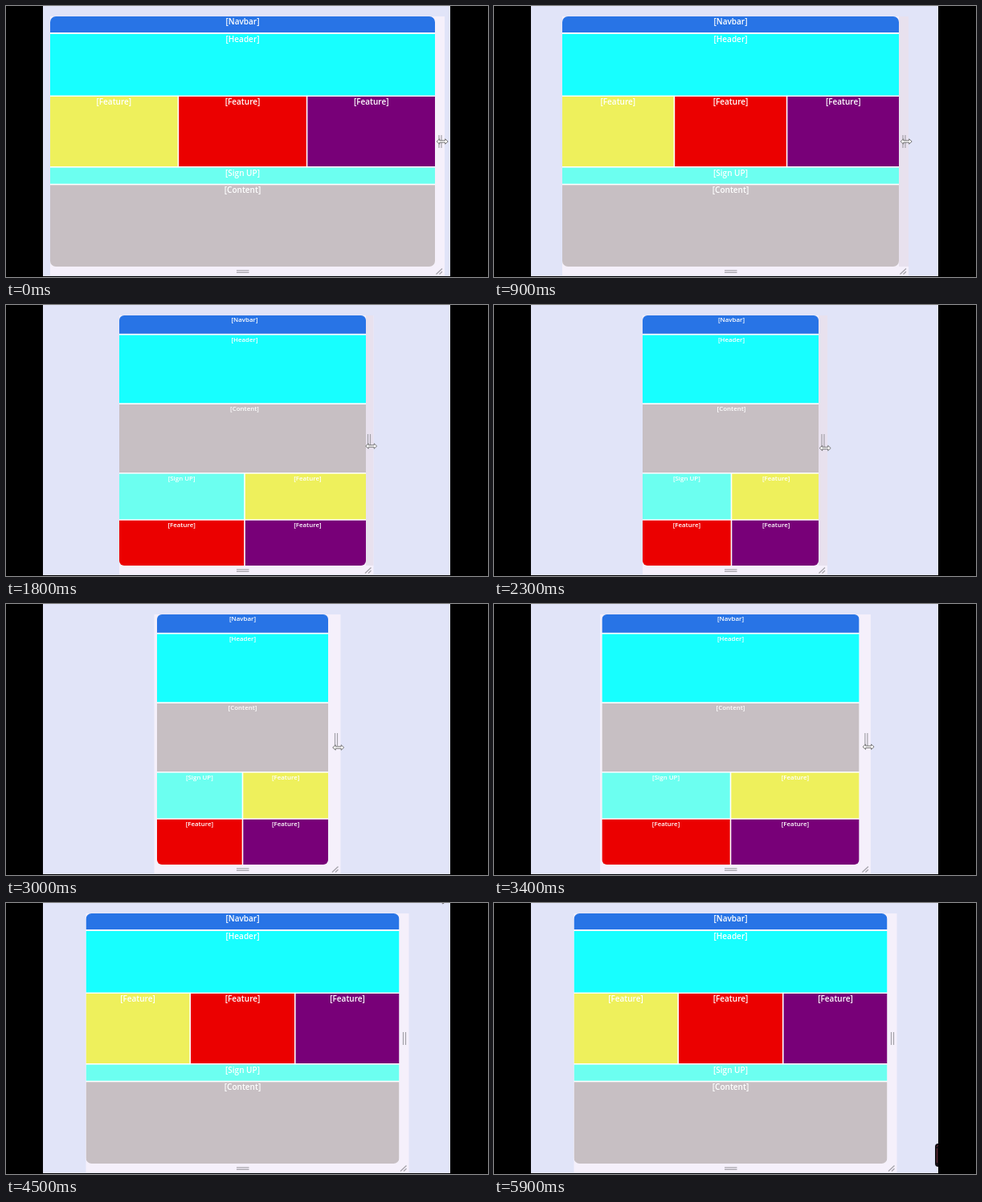
Animation of 600x338 px, one loop 6000 ms. Source, as an HTML page with a canvas:

```html
<!DOCTYPE html>
<html lang="en">
<head>
<meta charset="utf-8">
<title>Responsive grid</title>
<style>
  html, body { margin: 0; width: 100%; height: 100%; overflow: hidden; background: #000; }
  canvas { display: block; }
</style>
</head>
<body>
<canvas id="stage" width="600" height="338"></canvas>
<script>
const ctx = document.getElementById('stage').getContext('2d');
const LOOP = 6000, STEP = 100, MIRROR = 589, GAP = 1.6;
const BREAKPOINT = 350;

// [time, left edge of the grid, layout lag while dragging, cursor y]
const drag = [
  [0, 55, 0, 169], [700, 81, 0, 169], [900, 85, 0, 169], [1400, 117, 0, 172],
  [1800, 141, -5, 176], [2100, 169, -4, 178], [2500, 201, 0, 179], [2700, 202, 0, 179],
  [3000, 188, 3.5, 179], [3500, 121, 2, 178], [3700, 107, 0, 177], [4100, 97, 0, 177],
  [4300, 99.5, 0, 177], [6000, 99.5, 0, 177]
];

const color = {
  Navbar: '#2874e6', Header: '#17ffff', Content: '#c7bfc3', 'Sign UP': '#6cfff0',
  yellow: '#eef05c', red: '#eb0000', purple: '#780078'
};

// Rows: top, bottom, cells
const features = ['yellow', 'red', 'purple'];
const wide = [
  [13, 33, ['Navbar']], [35, 111.5, ['Header']], [113, 200, features],
  [201.6, 221.7, ['Sign UP']], [223.3, 325, ['Content']]
];
const narrow = [
  [13, 35.8, ['Navbar']], [37.5, 122.3, ['Header']], [124, 209, ['Content']],
  [210.5, 267.2, ['Sign UP', 'yellow']], [268.7, 325, ['red', 'purple']]
];

function poseAt(t) {
  const i = Math.max(1, drag.findIndex(k => k[0] >= t));
  const a = drag[i - 1], b = drag[i];
  const p = (t - a[0]) / (b[0] - a[0]);
  return [1, 2, 3].map(n => a[n] + (b[n] - a[n]) * p);
}

function box(x1, y1, x2, y2, fill) {
  ctx.fillStyle = fill;
  ctx.fillRect(x1, y1, x2 - x1, y2 - y1);
}

function line(x1, y1, x2, y2) {
  ctx.beginPath();
  ctx.moveTo(x1, y1);
  ctx.lineTo(x2, y2);
  ctx.stroke();
}

function polygon(points, x, y) {
  ctx.beginPath();
  points.forEach(([px, py]) => ctx.lineTo(x + px, y + py));
  ctx.closePath();
  ctx.fillStyle = '#fff';
  ctx.fill();
  ctx.strokeStyle = '#666';
  ctx.lineWidth = 0.9;
  ctx.stroke();
}

function drawGrid(left, right, layoutRight) {
  const small = right - left < BREAKPOINT;
  ctx.save();
  ctx.beginPath();
  ctx.roundRect(left, 13, right - left, 312, small ? 6 : 7);
  ctx.clip();
  box(left, 13, right, 325, '#fff');
  ctx.font = `600 ${small ? 7.9 : 10}px "Open Sans", sans-serif`;
  ctx.textAlign = 'center';
  ctx.textBaseline = 'middle';
  for (const [top, bottom, cells] of small ? narrow : wide) {
    const w = (layoutRight - left - GAP * (cells.length - 1)) / cells.length;
    cells.forEach((name, i) => {
      const x = left + i * (w + GAP);
      box(x, top, x + w, bottom, color[name]);
      ctx.fillStyle = '#fff';
      const label = features.includes(name) ? 'Feature' : name;
      ctx.fillText(`[${label}]`, x + w / 2, top + (small ? 6 : 7.3));
    });
  }
  ctx.restore();
}

function drawGrips(edge) {
  ctx.strokeStyle = '#a3a1a8';
  ctx.lineWidth = 1.2;
  for (const d of [0, 3]) {
    line(287, 330 + d * 0.8, 302.5, 330 + d * 0.8);
    line(edge - 7 + d, 161, edge - 7 + d, 177);
  }
  line(edge - 10.5, 334.5, edge - 3, 327.5);
  line(edge - 6.5, 334.5, edge - 3, 331.2);
}

const half = [[-7, 0], [-3.5, -3.2], [-3.5, -1.2], [3.5, -1.2], [3.5, -3.2]];
const resizeArrow = [...half, ...half.map(([x, y]) => [-x, -y])];
const pointer = [[0, 0], [0, 10], [2.3, 8], [4, 12], [5.5, 11.3], [3.9, 7.4], [7, 7.2]];

function drawCursor(t, edge, y) {
  if (t < 4300) polygon(resizeArrow, edge - 2.8, y);
  else if (t < 5100) {
    const p = Math.min(1, (t - 4200) / 300);
    polygon(pointer, 501 + 38.5 * p, 177 - 188 * p);
  }
}

function draw(t) {
  const [left, lag, cursorY] = poseAt(t);
  const right = MIRROR - left;
  const grow = Math.max(0, lag), shrink = Math.max(0, -lag);
  const edge = right + 12 + grow - shrink * 0.5;

  box(0, 0, 600, 338, '#000');
  box(46, 0, 553, 337, '#e1e4f8');
  box(left - grow, 13, edge, 336, '#f5f0fb');
  if (t >= 300 && t < 2500) box(right, 13, edge, 325, '#e8e1ee');
  drawGrid(left, right, right + shrink);
  drawGrips(edge);
  drawCursor(t, edge, cursorY);

  // Dark panel peeking in from the right
  if (t >= 5800) {
    ctx.beginPath();
    ctx.roundRect(549, 300, 12, 29, 4);
    ctx.fillStyle = '#141014';
    ctx.fill();
    ctx.strokeStyle = '#8c3546';
    ctx.lineWidth = 0.7;
    line(551, 304, 553, 302);
    line(551.5, 306, 551.5, 324);
    box(553, 298, 600, 331, '#000');
  }
}

function frame(now) {
  draw(Math.floor((now % LOOP) / STEP) * STEP);
  requestAnimationFrame(frame);
}
requestAnimationFrame(frame);
</script>
</body>
</html>
```
